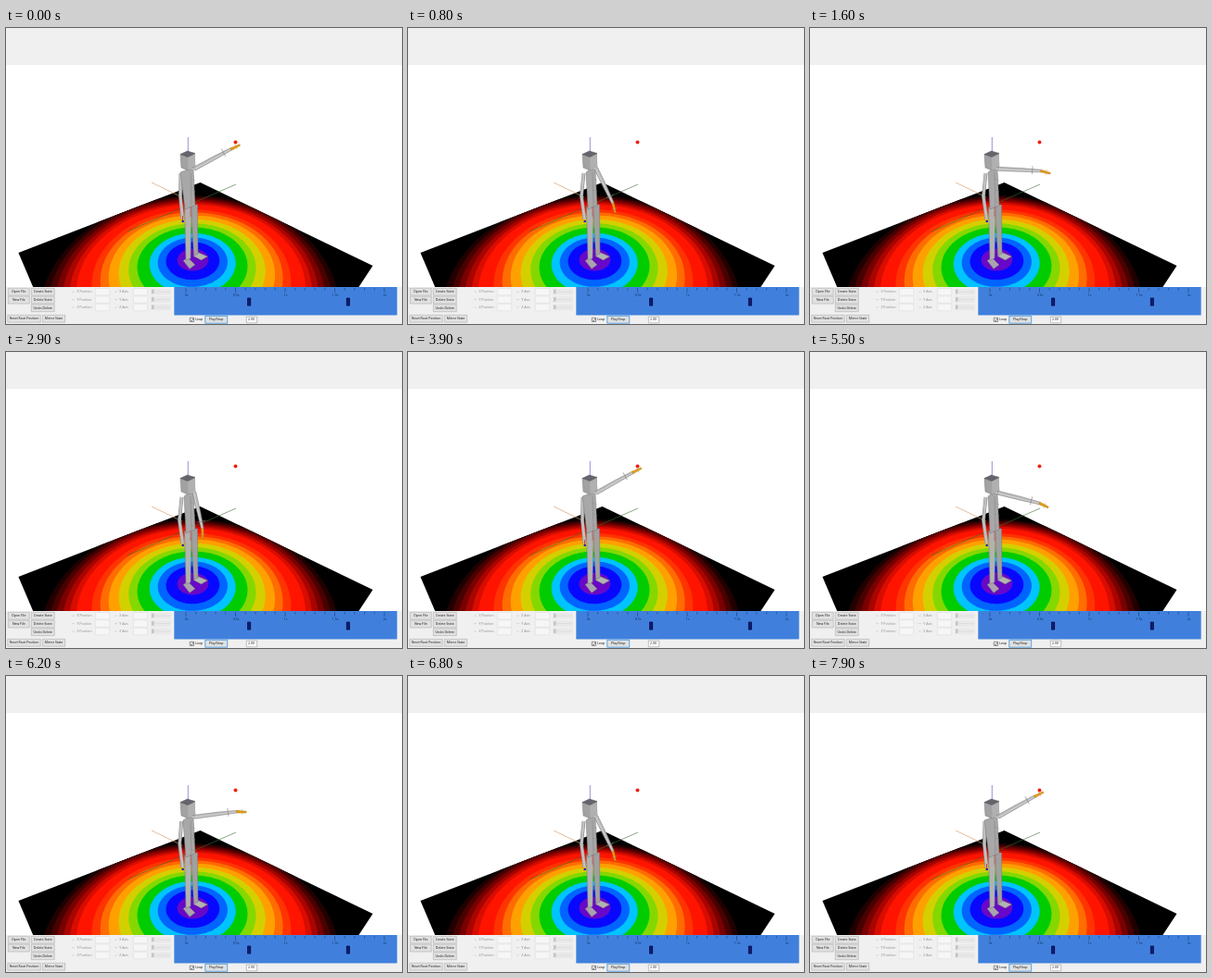
These frames come from a looping animation (427x320 px, 8000 ms). An HTML page with a canvas:

```html
<!DOCTYPE html>
<html lang="en">
<head>
<meta charset="utf-8">
<title>Arm swing</title>
<style>
html, body { margin: 0; width: 100%; height: 100%; overflow: hidden; background: #fff; }
canvas { display: block; width: 427px; height: 320px; }
</style>
</head>
<body>
<canvas id="stage"></canvas>
<script>
const W = 427, H = 320, TAU = Math.PI * 2;
const stage = document.getElementById('stage');
const ratio = window.devicePixelRatio || 1;
stage.width = W * ratio;
stage.height = H * ratio;
const c = stage.getContext('2d');

function rect(x, y, w, h, fill, edge) {
  c.fillStyle = fill;
  c.fillRect(x, y, w, h);
  if (edge) {
    c.strokeStyle = edge;
    c.lineWidth = 0.6;
    c.strokeRect(x + 0.3, y + 0.3, w - 0.6, h - 0.6);
  }
}

function poly(points, fill, edge) {
  c.beginPath();
  points.forEach(p => c.lineTo(p[0], p[1]));
  c.closePath();
  c.fillStyle = fill;
  c.fill();
  if (edge) {
    c.strokeStyle = edge;
    c.lineWidth = 0.5;
    c.stroke();
  }
}

function line(x1, y1, x2, y2, color, width = 0.7) {
  c.beginPath();
  c.moveTo(x1, y1);
  c.lineTo(x2, y2);
  c.strokeStyle = color;
  c.lineWidth = width;
  c.stroke();
}

function dot(x, y, r, color) {
  c.beginPath();
  c.arc(x, y, r, 0, TAU);
  c.fillStyle = color;
  c.fill();
}

function text(s, x, y, color = '#111', align = 'center') {
  c.font = '3.5px "Open Sans", sans-serif';
  c.textAlign = align;
  c.textBaseline = 'middle';
  c.fillStyle = color;
  c.fillText(s, x, y);
}

function button(s, x, y, w, edge = '#b0b0b0') {
  rect(x, y, w, 8.5, '#e1e1e1', edge);
  text(s, x + w / 2, y + 4.4);
}

// Perspective view of the floor; u and v run along its diagonals.
function ground(u, v) {
  const d = 1 - 0.0155 * u + 0.62 * v;
  return [201.5 + (191 * u + 13 * v) / d, 250 + (7 * u - 134.5 * v) / d];
}

const rings = [
  [0.75, '#200000'], [0.72, '#480000'], [0.69, '#780000'], [0.66, '#a80400'],
  [0.63, '#d80c00'], [0.6, '#ff1400'], [0.53, '#ff3400'], [0.49, '#ff6c00'],
  [0.45, '#ffa000'], [0.4, '#d4d000'], [0.35, '#84d800'], [0.305, '#00cc00'],
  [0.24, '#00c4ff'], [0.195, '#0064ff'], [0.15, '#0808ff'], [0.088, '#6808c8']
];

function drawFloor() {
  c.save();
  poly([ground(-1, 0), ground(0, 1), ground(1, 0), ground(0, -1)], '#000');
  c.clip();
  for (const [r, color] of rings) {
    const edge = Array.from({ length: 96 }, (_, i) =>
      ground(r * Math.cos(i * TAU / 96), r * Math.sin(i * TAU / 96)));
    poly(edge, color);
  }
  c.restore();
}

function drawAxes() {
  line(196.3, 118, 196.3, 134, '#6464c8');
  line(157, 167, 190, 183, '#d8a070');
  line(248, 169, 131, 220, '#3c6c34', 0.6);
}

function drawBody(k) {
  // Legs and feet
  poly([[191, 251.5], [196, 248], [204, 256], [198, 260.5]], '#aaa2b0', '#665a70');
  poly([[202, 246.5], [207, 242.5], [217.5, 247], [210.5, 251]], '#b4b4b4', '#666');
  poly([[199.5, 191], [206.5, 191], [207, 244], [202.5, 246]], '#a0a0a0', '#777');
  poly([[192.5, 194], [200, 192], [199, 249], [194, 251]], '#b2b2b2', '#777');

  // Far arm
  c.lineJoin = 'round';
  c.beginPath();
  c.moveTo(189.5 - k, 157);
  c.lineTo(187 + k, 182);
  c.lineTo(190.5, 207);
  c.lineWidth = 3.8;
  c.strokeStyle = '#858585';
  c.stroke();
  c.lineWidth = 2.8;
  c.strokeStyle = '#c0c0c0';
  c.stroke();
  dot(190.7, 209, 1.3, '#2020c0');
  if (k > 0.5) line(190.5, 203, 190.5, 208, '#d02020', 0.8);

  // Torso
  poly([[192 - 4 * k, 156], [196, 153], [202, 153], [204, 192], [194 - k, 196]], '#a8a8a8', '#777');
  line(199, 156, 200, 193, '#808080', 0.5);
  [163, 175, 187].forEach(y => line(199, y, 204, y + 2, '#909090', 0.5));
  line(199, 193, 199, 204, '#d83030', 0.6);

  // Head
  poly([[188, 136.5], [203, 136], [204, 150], [196.5, 154], [189, 151]], '#a2a2a2', '#777');
  poly([[196, 139.5], [204, 136], [204, 150], [196.5, 154]], '#b0b0b0');
  poly([[188, 136.5], [195.5, 133], [204, 135.5], [196, 139.5]], '#66646c', '#555');
}

function drawArm(deg, raised) {
  const a = deg * Math.PI / 180;
  const length = 38 + 8 * Math.cos(a);
  c.save();
  c.translate(203, 152.3);
  c.rotate(a);
  poly([[-1, -2], [length * 0.55, -2], [length, -1.3], [length, 1.3], [length * 0.5, 1.8], [0, 2]], '#bcbcbc', '#777');
  line(0, 0.5, length, 0.2, '#d4d4d4', 0.8);
  line(length * 0.8, -5, length * 0.8, 4, '#808080', 0.6);
  c.translate(length, 0);
  c.rotate(0.2 - 0.15 * raised);
  poly([[0, -1.3], [10.5, -0.8], [10.5, 0.8], [0, 1.3]], '#e8a010', '#b87808');
  line(6, -3, 6, 3, '#b0a080', 0.5);
  c.restore();
}

function drawPanel() {
  rect(0, 0, W, 40, '#f0f0f0');
  rect(0, 280, W, 40, '#f0f0f0');
  button('Open File', 2, 281, 23.5);
  button('New File', 2, 289.8, 23.5);
  button('Create State', 27, 281, 25.5);
  button('Delete State', 27, 289.8, 25.5);
  button('Undo Delete', 27, 298.5, 25.5);
  button('Reset Root Position', 1.5, 310, 36);
  button('Mirror State', 39, 310, 25);

  ['X', 'Y', 'Z'].forEach((name, i) => {
    const y = 285.2 + 8.4 * i;
    line(71, y, 74, y, '#ccc');
    line(117, y, 120, y, '#ccc');
    text(name + ' Position', 84.5, y, '#888');
    text(name + ' Axis', 127, y, '#888');
    rect(96, y - 4, 16, 8, '#f6f6f6', '#dcdcdc');
    rect(137, y - 4, 16, 8, '#f6f6f6', '#dcdcdc');
    rect(156, y - 3.3, 22, 6.6, '#e9e9e9');
    line(158, y, 177, y, '#d8d8d8');
    rect(157, y - 2.5, 2.5, 4.5, '#c4c4c4');
  });

  rect(181.3, 280, 240.4, 30.5, '#4080dc');
  for (let i = 0; i <= 20; i++) {
    const x = 194 + i * 10.7;
    line(x, 281, x, i % 5 ? 283.5 : 286, '#183c80', 0.6);
  }
  ['0s', '0.5s', '1s', '1.5s', '2s'].forEach((s, i) => text(s, 194.5 + i * 53.5, 288.8, '#102850'));
  [260.2, 367].forEach(x => rect(x, 291.8, 3.8, 8.5, '#101c70', '#081050'));

  rect(198, 313, 4.8, 4.8, '#fff', '#444');
  line(199, 315.5, 200.2, 316.8, '#222', 0.6);
  line(200.2, 316.8, 202, 314, '#222', 0.6);
  text('Loop', 204, 315.5, '#111', 'left');
  button('Play/Stop', 214.5, 311, 24.5, '#0878d8');
  rect(259, 311.7, 12, 7.4, '#fff', '#909090');
  text('2.00', 264.5, 315.5);
}

// The arm swings down and up at constant speed, with a slight perspective sag.
function armAngle(t) {
  const d = Math.abs((t + 55) % 2000 - 1000);
  return 83 - 0.117 * d - 4 * Math.sin(Math.PI * d / 1000);
}

function draw(now) {
  const t = Math.floor(now % 8000 / 100) * 100;
  const angle = armAngle(t);
  const raised = Math.max(0, Math.min(1, -angle / 28));
  c.setTransform(ratio, 0, 0, ratio, 0, 0);
  rect(0, 0, W, H, '#fff');
  drawFloor();
  drawAxes();
  drawBody(raised);
  dot(247.5, 123.5, 2, '#f02010');
  drawArm(angle, raised);
  drawPanel();
  requestAnimationFrame(draw);
}
requestAnimationFrame(draw);
</script>
</body>
</html>
```
